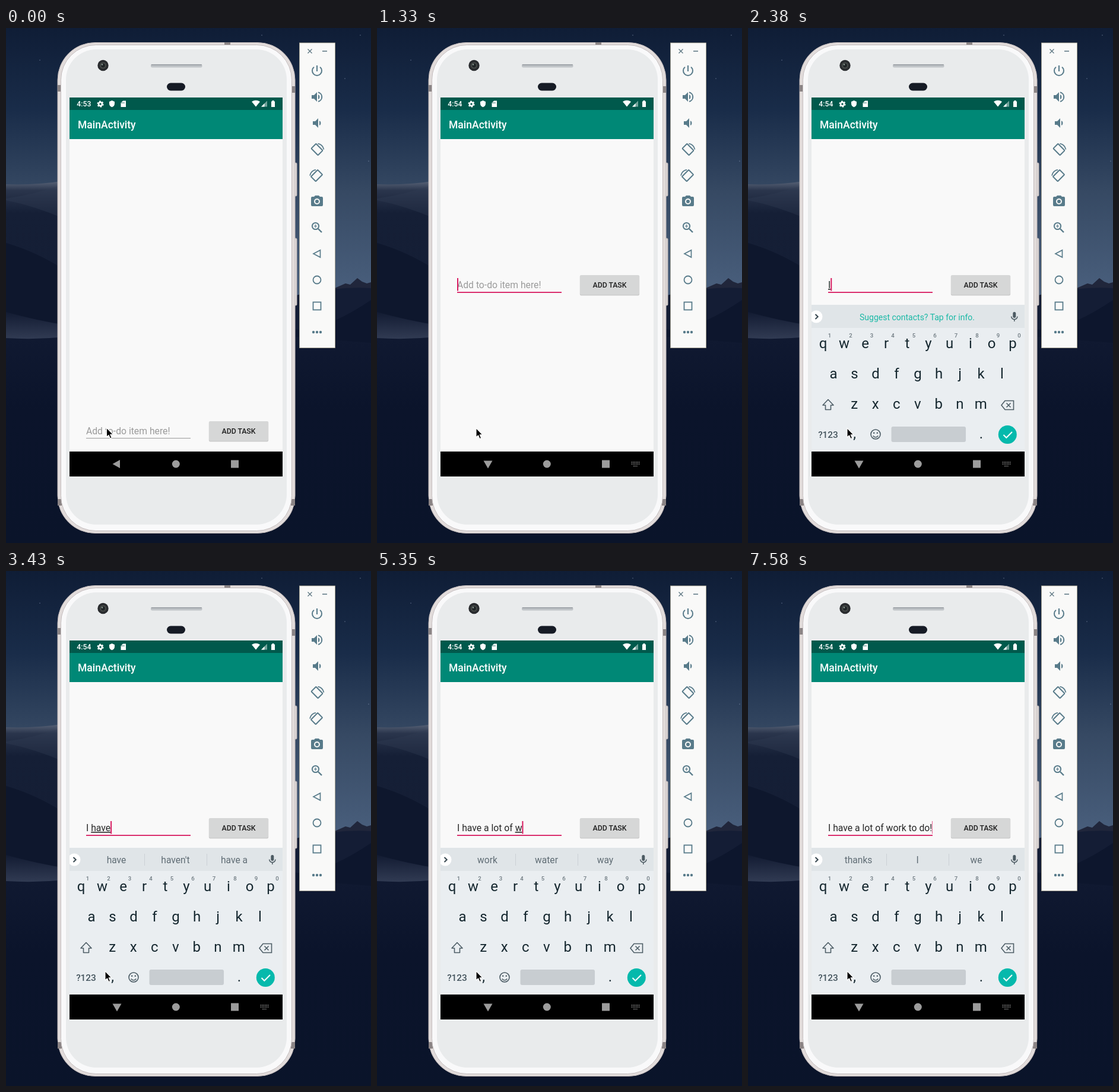
Write an HTML page that moves like this. It is 615 by 867 pixels and loops after 8000 ms.

```html
<!DOCTYPE html>
<html lang="en">
<head>
<meta charset="utf-8">
<title>To-do app on a phone emulator</title>
<style>
html, body { margin: 0; width: 100%; height: 100%; overflow: hidden; background: #0b152b; }
svg { display: block; width: 615px; height: 867px; }
text { font-family: Roboto, "Noto Sans", sans-serif; white-space: pre; }
.mid { text-anchor: middle; }
.med { font-weight: 500; }
.edit { font-size: 15.72px; }
.word { font-size: 15.6px; fill: #5f6c74; }
.key { font-size: 24px; fill: #15272f; }
.sup { font-size: 9.6px; font-weight: 500; fill: #6c787f; }
.line { fill: none; stroke-width: 2; }
#typed { fill: #262626; }
#comp { text-decoration: underline; text-decoration-thickness: 1px; text-underline-offset: 1.5px; }
</style>
</head>
<body>
<svg viewBox="0 0 615 867" xmlns="http://www.w3.org/2000/svg">
  <defs>
    <linearGradient id="sky" x2="0" y2="1">
      <stop offset="0" stop-color="#0f1d36"/><stop offset=".3" stop-color="#192c49"/>
      <stop offset=".6" stop-color="#364963"/><stop offset="1" stop-color="#4b617f"/>
    </linearGradient>
    <linearGradient id="dune" x2="0" y2="1">
      <stop offset="0" stop-color="#5a6579"/><stop offset=".06" stop-color="#2a354c"/>
      <stop offset=".2" stop-color="#151f36"/><stop offset="1" stop-color="#141d34"/>
    </linearGradient>
    <linearGradient id="haze" x2="0" y2="1">
      <stop offset="0" stop-color="#121b32"/><stop offset="1" stop-color="#323c54"/>
    </linearGradient>
    <linearGradient id="sand" x2="0" y2="1">
      <stop offset="0" stop-color="#101931"/><stop offset=".35" stop-color="#0b142b"/>
      <stop offset="1" stop-color="#0a142a"/>
    </linearGradient>
    <clipPath id="glass"><rect x="107" y="466" width="359" height="247"/></clipPath>
    <clipPath id="field"><rect x="130" y="655" width="181" height="45"/></clipPath>
  </defs>

  <!-- wallpaper -->
  <rect width="615" height="460" fill="url(#sky)"/>
  <g id="stars" fill="#a9b9d0"></g>
  <path d="M540 445 556 437 572 430 580 432 592 421 600 427 608 430 615 428V470H540Z" fill="#20263b"/>
  <path d="M480 452Q560 434 615 438V867H480Z" fill="#141d35"/>
  <path d="M480 507Q530 515 615 458V867H480Z" fill="#0d162d"/>
  <path d="M0 263Q50 265 100 257V530H0Z" fill="url(#dune)"/>
  <path d="M0 287Q50 280 100 262V322Q50 300 0 290Z" fill="#323d53" opacity=".35"/>
  <path d="M0 362Q50 376 100 408V530H0Z" fill="#0e172d"/>
  <path d="M0 478Q50 492 100 500V525H0Z" fill="url(#haze)"/>
  <path d="M0 522Q50 525 100 520H487L615 530V867H0Z" fill="url(#sand)"/>

  <!-- phone body -->
  <g>
    <rect x="485" y="227" width="5" height="56" rx="1.500" fill="#e3dddc" stroke="#b5aeaf"/>
    <rect x="485" y="354" width="5" height="113" rx="1.500" fill="#e3dddc" stroke="#b5aeaf"/>
    <rect x="87" y="24.500" width="400" height="826" rx="63" fill="#e2dcdb" stroke="#c3bbbb"/>
    <g fill="#8b8485">
      <rect x="87" y="96" width="7" height="11"/><rect x="480" y="98" width="7" height="11"/>
      <rect x="87" y="793" width="7" height="11"/><rect x="480" y="793" width="7" height="11"/>
      <rect x="368" y="24" width="10" height="5"/>
    </g>
    <rect x="92.500" y="28.500" width="389" height="818" rx="59" fill="#f9f9fa" stroke="#c4bdbe"/>
    <rect x="101" y="36" width="372" height="800" rx="51" fill="#e9ebec"/>
    <circle cx="163.500" cy="63" r="9.200" fill="#292b2e"/>
    <circle cx="163.500" cy="63" r="5.600" fill="#454947"/>
    <circle cx="163.500" cy="63" r="3.400" fill="#1f2426"/>
    <circle cx="162" cy="61.500" r="1.300" fill="#8c9a92"/>
    <rect x="244" y="61" width="86.500" height="5.500" rx="2.500" fill="#c0c4c8"/>
    <rect x="244.500" y="61" width="85.500" height="2" rx="1" fill="#a0a5aa"/>
    <rect x="271" y="92.500" width="31" height="13" rx="6.500" fill="#161b25"/>
  </g>

  <!-- app -->
  <rect x="107" y="117" width="359" height="638" fill="#f9f9f9"/>
  <rect x="107" y="138" width="359" height="49" fill="#008876"/>
  <rect x="107" y="117" width="359" height="21" fill="#00594c"/>
  <text class="med" x="121" y="169" font-size="17.500" fill="#fff">MainActivity</text>
  <g fill="#fff">
    <text id="clock" class="med" x="119.300" y="132.200" font-size="12.200"></text>
    <circle cx="159" cy="128" r="3" fill="none" stroke="#fff" stroke-width="2.600"/>
    <circle cx="159" cy="128" r="4.700" fill="none" stroke="#fff" stroke-width="1.800" stroke-dasharray="2.6 2.32"/>
    <path d="M178.500 122 183 124V127.500Q183 131.500 178.500 133.300 174 131.500 174 127.500V124Z"/>
    <path d="M197 122.500H202V133H193.500V126Z"/>
    <path d="M421 132.500 414 124Q421 119.500 428 124Z"/>
    <path d="M440 122.500V132.500H430Z" opacity=".45"/>
    <path d="M435.500 127V132.500H430Z"/>
    <path d="M447 123.500H448.500V122H451.500V123.500H453V133H447Z"/>
  </g>
  <path d="M195 125V127M197 125V127M199 125V127" stroke="#00594c" stroke-width=".8"/>

  <g id="form">
    <rect x="342" y="663" width="100" height="33.500" rx="2" fill="#000" opacity=".16"/>
    <rect x="341.500" y="662.500" width="101" height="33" rx="2" fill="#000" opacity=".07"/>
    <rect x="342" y="662" width="100" height="33" rx="2" fill="#d6d7d7"/>
    <text class="mid med" x="392" y="683" font-size="12.300" fill="#1f1f1f">ADD TASK</text>
    <rect id="rule" x="135" width="176"/>
    <text id="hint" class="edit" x="135" y="684" fill="#9b9b9b">Add to-do item here!</text>
    <text id="typed" class="edit" x="135" y="684"><tspan id="done"></tspan><tspan id="comp"></tspan></text>
    <g clip-path="url(#field)"><rect id="caret" y="667" width="2" height="21.500" fill="#d81b60"/></g>
  </g>

  <!-- keyboard -->
  <g clip-path="url(#glass)">
    <g id="board">
      <rect x="107" y="466" width="359" height="247" fill="#eaeef1"/>
      <rect x="107" y="466" width="359" height="39" fill="#e0e5e8"/>
      <circle cx="115" cy="486" r="10.500" fill="#fff"/>
      <path class="line" d="M113.500 482 117.700 486 113.500 490" stroke="#37474f"/>
      <g fill="#4d5b63">
        <rect x="446.300" y="478" width="5" height="10" rx="2.500"/>
        <path class="line" d="M443.700 485.500A5 5 0 0 0 453.900 485.500M448.800 490.500V494" stroke="#4d5b63" style="stroke-width:1.500"/>
      </g>
      <text id="info" class="mid" x="285" y="491.500" font-size="14" fill="#1ab9a6">Suggest contacts? Tap for info.</text>
      <g id="words">
        <path d="M233.500 476V496M338.500 476V496" stroke="#cbd1d5"/>
        <text class="mid word" x="186" y="492"></text>
        <text class="mid word" x="285.500" y="492"></text>
        <text class="mid word" x="384.500" y="492"></text>
      </g>
      <g id="keys"></g>
      <g fill="none" stroke="#4d5d66" stroke-width="1.600">
        <path d="M135 625.500 144 635H139.500V642.500H130.500V635H126Z" stroke-linejoin="round"/>
        <path d="M433 627.500H447.500V642.500H433L427 635ZM435.500 631.500 442.500 638.500M442.500 631.500 435.500 638.500"/>
        <circle cx="215" cy="684" r="8"/>
        <path d="M210.700 686.500Q215 691.500 219.300 686.500"/>
      </g>
      <circle cx="212.200" cy="681.700" r="1.300" fill="#4d5d66"/>
      <circle cx="217.800" cy="681.700" r="1.300" fill="#4d5d66"/>
      <text class="mid med" x="135" y="689.500" font-size="15.400" fill="#44545d">?123</text>
      <rect x="241.500" y="671" width="125.500" height="26" rx="3" fill="#c8cdd1"/>
      <circle cx="437.300" cy="684.500" r="15.500" fill="#05b9ac"/>
      <path class="line" d="M430.500 685 435.300 689.800 445 680" stroke="#fff"/>
    </g>
  </g>

  <!-- navigation bar -->
  <rect x="107" y="713" width="359" height="42" fill="#000"/>
  <g fill="#9c9c9c">
    <path id="back"/>
    <circle cx="286.300" cy="734" r="6.500"/>
    <rect x="379" y="727.500" width="13" height="13"/>
    <path id="ime" d="M428.500 731H442.500M428.500 734H442.500M432 737.500H439" stroke="#8d8d8d" stroke-width="1.500" stroke-dasharray="1.5 1"/>
  </g>

  <!-- emulator toolbar -->
  <rect x="494.500" y="25" width="60" height="513.500" fill="#f9f9f8" stroke="#aaa58f" stroke-width=".8"/>
  <path d="M508.500 35.500 515.500 42.500M515.500 35.500 508.500 42.500M533 39H541" stroke="#5a7480" stroke-width="1.300"/>
  <g fill="#587b8a" stroke="#587b8a" stroke-width="0">
    <path class="line" transform="translate(524 72)" d="M0 -9V1M-5.100 -6.200A8 8 0 1 0 5.100 -6.200"/>
    <g transform="translate(524 116)">
      <path d="M-9 -3V3H-5L0 8V-8L-5 -3ZM2 -4V4Q4.500 3 4.500 0T2 -4Z"/>
      <path class="line" d="M2 -7.800A8 8 0 0 1 2 7.800"/>
    </g>
    <path transform="translate(524 160)" d="M-7 -3V3H-3L2 8V-8L-3 -3ZM4 -4V4Q6.500 3 6.500 0T4 -4Z"/>
    <g id="turn" transform="translate(524 204.500)">
      <rect class="line" x="-5.700" y="-8" width="11.400" height="16" rx="1" transform="rotate(-45)"/>
      <path class="line" d="M1.500 -9.800Q9.500 -8.500 11.500 0" style="stroke-width:1.700"/>
    </g>
    <use href="#turn" transform="translate(1047.500 44) scale(-1 1)"/>
    <g transform="translate(524 291.500)">
      <path d="M-3 -9.500H3L5 -7.500H8Q10 -7.500 10 -5.500V6.500Q10 8.500 8 8.500H-8Q-10 8.500 -10 6.500V-5.500Q-10 -7.500 -8 -7.500H-5Z"/>
      <circle r="4" cy=".5" class="line" style="stroke:#f9f9f8"/>
    </g>
    <g transform="translate(524 336)">
      <circle class="line" cx="-2.500" cy="-2.500" r="5.600"/>
      <path class="line" d="M2 2 8 8" style="stroke-width:2.400"/>
      <path class="line" d="M-5.200 -2.500H.2M-2.500 -5.200V.2" style="stroke-width:1.200"/>
    </g>
    <path class="line" d="M518 380 529.500 374V386Z" style="stroke-width:1.700"/>
    <circle class="line" cx="524" cy="424" r="6.500" style="stroke-width:1.800"/>
    <rect class="line" x="517.500" y="461.500" width="13" height="13" style="stroke-width:1.800"/>
    <circle cx="518" cy="512" r="2.200"/><circle cx="524" cy="512" r="2.200"/><circle cx="530" cy="512" r="2.200"/>
  </g>

  <path id="mouse" d="M0 0V15.500L3.500 12.300 6 18 8.600 16.900 6.200 11.300H11Z" fill="#000" stroke="#fff" stroke-width="1.100" stroke-linejoin="round"/>
</svg>

<script>
const LOOP = 8000;
const $ = id => document.getElementById(id);
const NS = 'http://www.w3.org/2000/svg';

function add(parent, tag, attrs, text = '') {
  const el = document.createElementNS(NS, tag);
  for (const name in attrs) el.setAttribute(name, attrs[name]);
  el.textContent = text;
  parent.append(el);
}

// Keys, one row at a time: letters, first centre, baseline
[['qwertyuiop', 126.5, 539], ['asdfghjkl', 144, 590], ['zxcvbnm', 179.3, 641]].forEach(([row, x0, y], r) => {
  [...row].forEach((ch, i) => {
    const x = x0 + i * 35.5;
    add($('keys'), 'text', { class: 'mid key', x, y }, ch);
    if (r === 0) add($('keys'), 'text', { class: 'mid sup', x: x + 11, y: 521 }, (i + 1) % 10);
  });
});
add($('keys'), 'text', { class: 'mid key', x: 179.5, y: 691 }, ',');
add($('keys'), 'text', { class: 'mid key', x: 393, y: 691 }, '.');

[[57, 54], [431, 12], [597, 12], [571, 85], [611, 224]].forEach(([cx, cy]) =>
  add($('stars'), 'circle', { cx, cy, r: .6 }));

// time, text, length still being composed, suggestions
const TYPING = [
  [0, '', 0, ''],
  [2380, 'I', 1, ''],
  [2680, 'I ', 0, 'am,will,have'],
  [2830, 'I h', 1, 'have,had,here'],
  [2980, 'I ha', 2, 'have,had,has'],
  [3280, 'I hav', 3, 'have,having,had'],
  [3430, 'I have', 4, "have,haven't,have a"],
  [3730, 'I have ', 0, 'a,to,been'],
  [3870, 'I have a', 1, 'a,an,about'],
  [4020, 'I have a ', 0, 'lot,few,question'],
  [4310, 'I have a l', 1, 'lot,little,long'],
  [4460, 'I have a lot', 3, 'lot,lots,a lot'],
  [4610, 'I have a lot ', 0, 'to,of,going'],
  [4910, 'I have a lot o', 1, 'of,on,or'],
  [5060, 'I have a lot of', 2, 'of,off,of the'],
  [5210, 'I have a lot of ', 0, 'work,things,people'],
  [5350, 'I have a lot of w', 1, 'work,water,way'],
  [5650, 'I have a lot of wo', 2, 'work,wood,women'],
  [5800, 'I have a lot of work', 4, 'work,works,workload'],
  [5950, 'I have a lot of work ', 0, 'to,and,for'],
  [6100, 'I have a lot of work t', 1, 'to,the,this'],
  [6250, 'I have a lot of work to', 2, 'to,to do,too'],
  [6390, 'I have a lot of work to ', 0, 'do,be,get'],
  [6690, 'I have a lot of work to d', 1, 'do,day,did'],
  [6840, 'I have a lot of work to do', 2, 'do,done,do it'],
  [7580, 'I have a lot of work to do!', 0, 'thanks,I,we']
];
const CARET = [[0, 0], [890, 1], [1480, 0], [1930, 1], [7280, 0], [7580, 1]];
const MOUSE = [[0, 169.5, 673], [150, 169, 674.5], [450, 168, 677.5], [590, 167.5, 679], [890, 167, 673.5]];
const BOARD = [[0, 260], [1480, 70], [1630, 0]];
const FOCUS = 890, RAISE = 1190;

const at = (steps, t) => steps.findLast(s => s[0] <= t);
const show = (el, on) => el.setAttribute('visibility', on ? 'visible' : 'hidden');
const shift = (el, x, y) => el.setAttribute('transform', `translate(${x} ${y})`);
const pen = document.createElement('canvas').getContext('2d');

function draw(t) {
  const [, text, live, words] = at(TYPING, t);
  const [, mx, my] = at(MOUSE, t);
  const focus = t >= FOCUS, up = t >= RAISE;
  const cut = text.length - live;

  $('clock').textContent = t < 150 ? '4:53' : '4:54';
  shift($('mouse'), mx, my);
  shift($('form'), 0, up ? -246 : 0);
  shift($('board'), 0, at(BOARD, t)[1]);

  $('rule').setAttribute('y', focus ? 690.2 : 690);
  $('rule').setAttribute('height', focus ? 1.8 : 1.2);
  $('rule').setAttribute('fill', focus ? '#d81b60' : '#a6a6a6');
  $('back').setAttribute('d', up ? 'M179.500 728.500H194.500L187 741.500Z' : 'M179.500 734 192 727V741Z');
  show($('ime'), up);

  show($('hint'), !text);
  $('done').textContent = text.slice(0, cut);
  $('comp').textContent = text.slice(cut);
  pen.font = '15.72px Roboto, "Noto Sans", sans-serif';
  $('caret').setAttribute('x', 135 + pen.measureText(text).width);
  show($('caret'), at(CARET, t)[1]);

  show($('info'), !words);
  show($('words'), words);
  const list = words.split(',');
  $('words').querySelectorAll('text').forEach((el, i) => { el.textContent = list[i] || ''; });
}

const start = performance.now();
function tick() {
  draw((performance.now() - start) % LOOP);
  requestAnimationFrame(tick);
}
tick();
</script>
</body>
</html>
```
